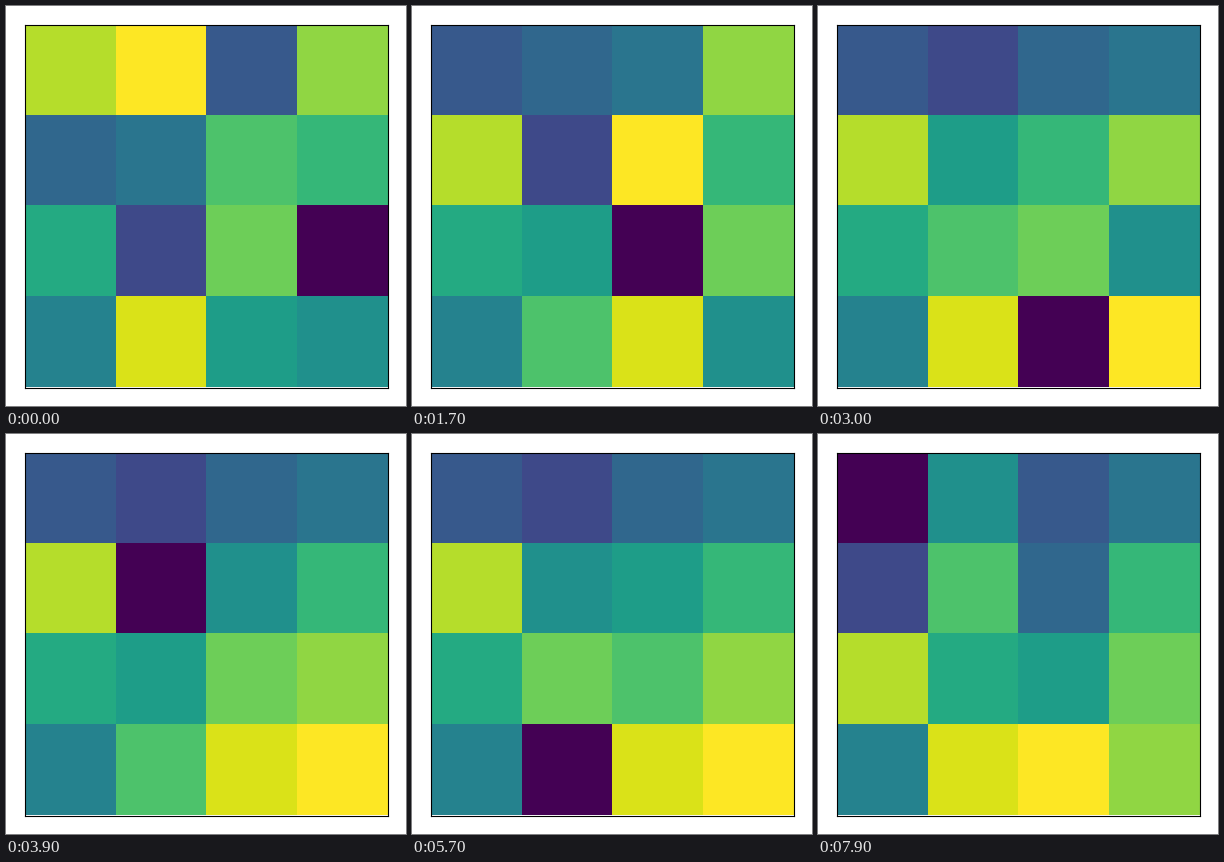
A matplotlib script for the animation above (8000 ms loop, 400 by 400 pixels).

```python
import numpy as np
import matplotlib.pyplot as plt
from matplotlib.animation import FuncAnimation

SIZE = 400
MARGIN = 18.5
BLANK = -3  # well below tile 1, so the gap stands out
START = np.array([[13, 15, 2, 12],
                  [3, 4, 10, 9],
                  [8, 1, 11, BLANK],
                  [5, 14, 7, 6]])

# Moves of the gap, one per frame
MOVES = ("LULURDLLURDDRDLUR" "URULLDDDRURDL" "URULDDLUU"
         "RDLDRUULDRDLUURDLD" "RRUULDLLUR" "ULDRRRDLUULL")
STEP = {"U": (-1, 0), "D": (1, 0), "L": (0, -1), "R": (0, 1)}


def play(board, moves):
    """Return every board of the game, starting position included."""
    boards = [board.copy()]
    r, c = np.argwhere(board == BLANK)[0]
    for move in moves:
        dr, dc = STEP[move]
        board = boards[-1].copy()
        board[r, c], board[r + dr, c + dc] = board[r + dr, c + dc], BLANK
        r, c = r + dr, c + dc
        boards.append(board)
    return boards


boards = play(START, MOVES)

fig = plt.figure(figsize=(SIZE / 100, SIZE / 100), dpi=100, facecolor="white")
low, span = MARGIN / SIZE, (SIZE - 2 * MARGIN) / SIZE
ax = fig.add_axes([low, low, span, span])
ax.set_xticks([])
ax.set_yticks([])
img = ax.imshow(START, cmap="viridis", vmin=BLANK, vmax=15,
                interpolation="nearest", aspect="auto")


def update(i):
    img.set_data(boards[i])
    return (img,)


anim = FuncAnimation(fig, update, frames=len(boards), interval=100,
                     repeat=True, repeat_delay=0)
plt.show()
```
